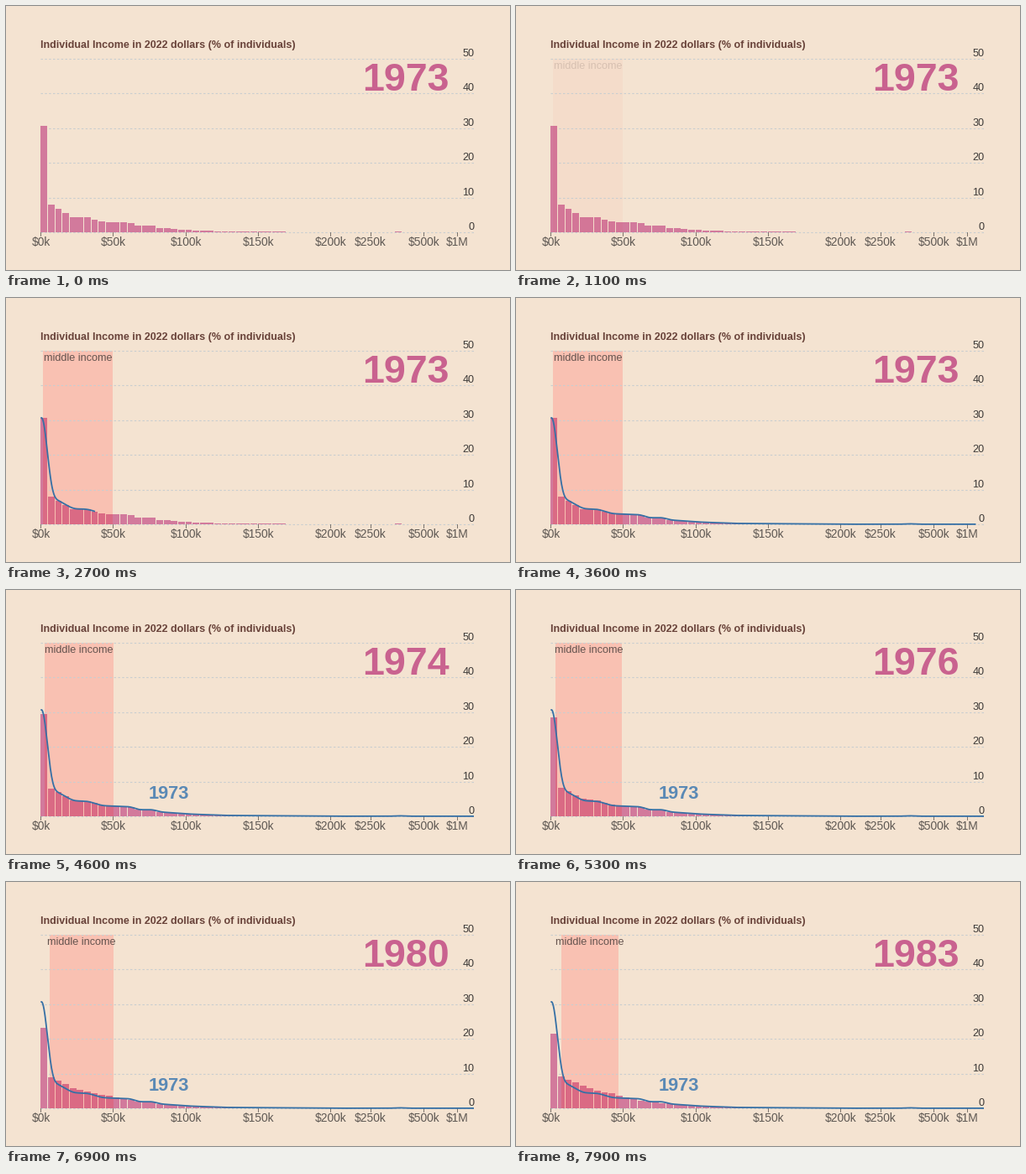
Animation, 600 px wide and 315 px high, one loop 8 s. Source, as a matplotlib script:

```python
import numpy as np
import matplotlib.pyplot as plt
from matplotlib.animation import FuncAnimation
from matplotlib.collections import PolyCollection
from matplotlib.patches import Rectangle

plt.rcParams["font.family"] = ["Liberation Sans", "DejaVu Sans"]

W, H, DPI = 600, 315, 100
FRAMES, STEP = 80, 100
LEFT, RIGHT, BASE, UNIT = 41.3, 557, 270.2, 4.145
PITCH, N = 8.61, 60

BG, BAR, BAND, BAND_BAR = "#f4e3d1", "#d27a9c", "#f9c1b2", "#da6a84"
PINK, BLUE, LABEL_BLUE = "#c9628f", "#3670a5", "#5a89b5"
BROWN, GREY, DARK, GRID = "#69433a", "#5e5853", "#3d3a38", "#c9ced0"

# Drift of the lowest bin and of the middle band's edges
KEY_TIMES = [4300, 4600, 6000, 6900, 7900]
LOWEST = [30.7, 29.4, 27.5, 23.2, 21.4]
BAND_LEFT = [43.5, 45.5, 47.5, 52.0, 53.5]
BAND_RIGHT = [126.5, 127.5, 123.8, 127.5, 122.0]

# Outline of the other bins in the first and last year
KEY_BINS = [1, 4, 6, 8, 12, 13, 15, 16, 20, 25, 40]
EARLY = np.array([8.0, 4.5, 4.4, 3.1, 2.8, 1.9, 2.0, 1.3, 0.7, 0.3, 0.07])
LATE = np.array([9.3, 6.5, 5.2, 4.3, 2.2, 2.0, 1.6, 1.4, 0.7, 0.3, 0.07])
bins = np.arange(N)


def ramp(t, start, length):
    return min(max((t - start) / length, 0), 1)


def cubic_in_out(u):
    return 4 * u**3 if u < 0.5 else 1 - 4 * (1 - u)**3


def key(t, values):
    return np.interp(t, KEY_TIMES, values)


def shares_at(t):
    g = ramp(t, 4300, 3600)
    shares = np.interp(bins, KEY_BINS, EARLY + g * (LATE - EARLY))
    shares[0] = key(t, LOWEST)
    shares[49] = 0.25
    return shares


def bar_polys(values):
    x0 = LEFT + bins * PITCH
    x1 = x0 + PITCH - 0.7
    top = BASE - values * UNIT
    floor = np.full(N, BASE)
    return np.stack([np.c_[x0, floor], np.c_[x0, top],
                     np.c_[x1, top], np.c_[x1, floor]], axis=1)


def b_spline(pts, steps=12):
    """Uniform cubic B-spline that starts and ends on the end points."""
    p = np.concatenate([pts[:1], pts[:1], pts, pts[-1:], pts[-1:]])
    u = np.linspace(0, 1, steps, endpoint=False)
    weights = np.stack([(1 - u)**3, 3*u**3 - 6*u**2 + 4,
                        -3*u**3 + 3*u**2 + 3*u + 1, u**3], axis=1) / 6
    parts = [weights @ p[i:i + 4] for i in range(len(p) - 3)]
    return np.concatenate(parts + [pts[-1:]]).T


first = shares_at(0)
centres = LEFT + (bins + 0.5) * PITCH
knot_x = np.r_[LEFT, centres, RIGHT]
knot_y = BASE - UNIT * np.r_[first[0], first, first[-1]]
curve_x, curve_y = b_spline(np.c_[knot_x, knot_y])
run = np.append(0, np.cumsum(np.hypot(np.diff(curve_x), np.diff(curve_y))))


def curve_part(f):
    end = f * run[-1]
    n = np.searchsorted(run, end)
    return (np.append(curve_x[:n], np.interp(end, run, curve_x)),
            np.append(curve_y[:n], np.interp(end, run, curve_y)))


fig = plt.figure(figsize=(W / DPI, H / DPI), dpi=DPI, facecolor=BG)
ax = fig.add_axes([0, 0, 1, 1])
ax.set_xlim(0, W)
ax.set_ylim(H, 0)
ax.axis("off")


def px(n):
    return n * 72 / DPI


def label(x, y, s, size, color, ha="center", weight="normal"):
    return ax.text(x, y, s, fontsize=px(size), color=color, ha=ha,
                   va="baseline", weight=weight, zorder=6)


label(41, 50.3, "Individual Income in 2022 dollars (% of individuals)",
      12.55, BROWN, ha="left", weight="bold")

for v in range(0, 51, 10):
    y = BASE - v * UNIT
    ax.plot([LEFT, RIGHT], [y, y], color=GRID, lw=px(1.1),
            dashes=(2.2, 2.2), dash_capstyle="butt", zorder=1)
    label(RIGHT + 0.5, y - 3.1, str(v), 12.6, DARK, ha="right")

ticks = [(LEFT + 86.1 * i, f"${50 * i}k") for i in range(5)]
ticks += [(433.5, "$250k"), (497, "$500k"), (537, "$1M")]
for x, s in ticks:
    ax.plot([x, x], [BASE, BASE + 4], color=GREY, lw=px(0.8), zorder=1)
    label(x + 0.6, 286, s, 13.8, GREY)

band = Rectangle((0, BASE - 50 * UNIT), 1, 50 * UNIT, fc=BAND, ec="none", zorder=0.5)
ax.add_patch(band)
bars, band_bars = [PolyCollection(bar_polys(first), facecolors=c,
                                  edgecolors="none", zorder=z)
                   for c, z in ((BAR, 2), (BAND_BAR, 3))]
ax.add_collection(bars, autolim=False)
ax.add_collection(band_bars, autolim=False)

band_label = label(85, 75, "middle income", 12.6, "#65544f")
line, = ax.plot([], [], color=BLUE, lw=px(1.8), solid_capstyle="butt", zorder=5)
year_label = label(476.3, 100.7, "1973", 46.7, PINK, weight="bold")
base_label = label(194, 249.2, "1973", 21.8, LABEL_BLUE, weight="bold")


def update(i):
    t = i * STEP
    polys = bar_polys(shares_at(t))
    bars.set_verts(polys)
    band_bars.set_verts(polys)

    left, right = key(t, BAND_LEFT), key(t, BAND_RIGHT)
    band.set_x(left)
    band.set_width(right - left)
    band_bars.set_clip_path(band)
    band_label.set_x((left + right) / 2 + 0.3)
    shown = ramp(t, 1000, 500)
    for part in (band, band_bars, band_label):
        part.set_alpha(shown)

    drawn = cubic_in_out(ramp(t, 1900, 2020))
    line.set_data(*curve_part(drawn))
    line.set_visible(drawn > 0)
    base_label.set_alpha(ramp(t, 3900, 400))

    year = 1973 + max(0, int((t - 4400) // 375) + 1)
    year_label.set_text(str(year))
    return bars, band, band_bars, band_label, line, base_label, year_label


anim = FuncAnimation(fig, update, frames=FRAMES, interval=STEP,
                     repeat=True, repeat_delay=0, blit=False)
plt.show()
```
